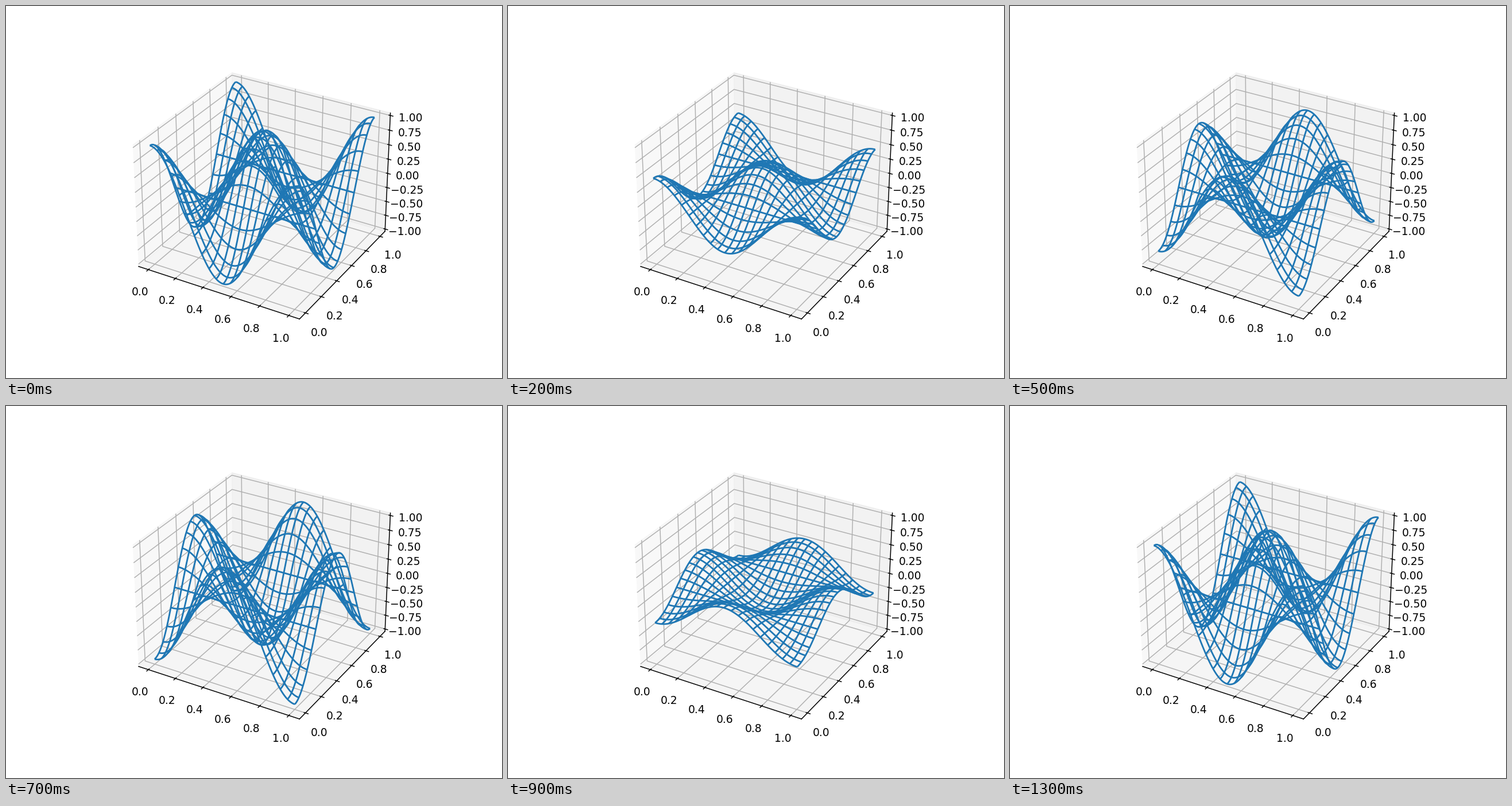
A matplotlib script that plays this animation: 864x648 px, repeating every 1400 ms.

```python
import numpy as np
import matplotlib.pyplot as plt
from matplotlib.animation import FuncAnimation

FRAMES = 14
INTERVAL = 100
STEPS_PER_CYCLE = 40
PAD = 1 / 48  # blank border around each axis, as a share of its span


def padded(low, high):
    border = (high - low) * PAD
    return low - border, high + border


fig = plt.figure(figsize=(6.4, 4.8), dpi=135)
ax = fig.add_subplot(projection="3d")
ax.set_xlim(*padded(-0.05, 1.05))
ax.set_ylim(*padded(-0.05, 1.05))
ax.set_zlim(*padded(-1, 1))
ax.set_xticks(np.arange(0, 1.01, 0.2))
ax.set_yticks(np.arange(0, 1.01, 0.2))
ax.set_zticks(np.arange(-1, 1.01, 0.25))

grid = np.linspace(0, 1, 101)
X, Y = np.meshgrid(grid, grid)
MODE = np.cos(2 * np.pi * X) * np.cos(2 * np.pi * Y)
mesh = None


def amplitude(frame):
    # Three fine steps per frame; the first move takes one extra.
    step = 3 * frame + (frame > 0)
    return np.cos(2 * np.pi * step / STEPS_PER_CYCLE)


def update(frame):
    global mesh
    if mesh is not None:
        mesh.remove()
    mesh = ax.plot_wireframe(X, Y, amplitude(frame) * MODE,
                             rstride=5, cstride=5, color="C0", linewidth=1.5)
    return [mesh]


anim = FuncAnimation(fig, update, frames=FRAMES, interval=INTERVAL,
                     init_func=lambda: update(0), repeat=True, repeat_delay=0)
plt.show()
```
